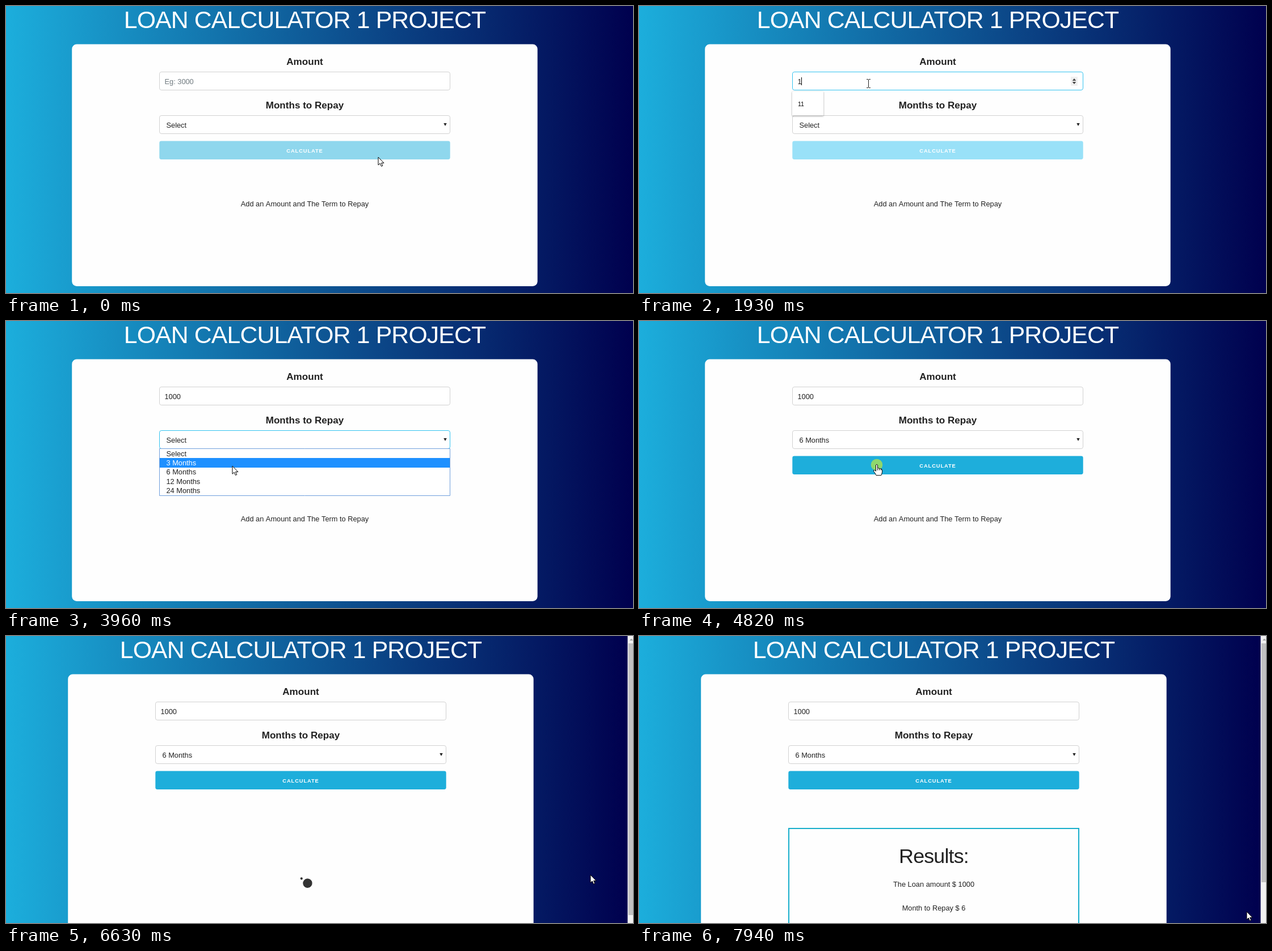
An HTML page with a canvas for the animation above (8000 ms loop, 1105 by 507 pixels).

```html
<!DOCTYPE html>
<html lang="en">
<head>
<meta charset="utf-8">
<title>Loan calculator</title>
<style>
html, body { margin: 0; width: 100%; height: 100%; overflow: hidden; }
canvas { display: block; }
</style>
</head>
<body>
<canvas id="stage" width="1105" height="507"></canvas>
<script>
const W = 1105, H = 507, LOOP = 8000;
const ctx = document.getElementById('stage').getContext('2d');
const SANS = '"Liberation Sans", Arial, sans-serif';
const CYAN = '#33c3f0', INK = '#222', GREY = '#d1d1d1';
const LEFT = 270, MID = 526.5, ROW = 16.2;

// Story beats in ms
const FOCUS = 930, KEYS = [1930, 2010, 2160, 2240], OPEN = 3320, PICK = 4270,
  CLOSE = 4340, PRESS = 4715, LOAD = 4870, DONE = 7940;

// Pointer moves: from ms, to ms, target x, target y
const moves = [
  [69, 70, 640, 187], [170, 530, 437, 137], [740, 760, 404, 137],
  [2900, 3300, 394, 209], [3740, 4040, 400, 266], [4450, 4650, 419, 254],
  [6010, 6170, 624, 243], [6170, 6620, 1030, 422], [6660, 7200, 1071, 487]
];
const clicks = [[835, 1000], [OPEN, 3490], [PICK, CLOSE], [PRESS, 4960]];

const ARROW = new Path2D('M0 0V14L3.2 11L5.5 16.2L7.8 15.2L5.6 10.3H10Z');
const HAND = new Path2D('M-1.5 .4Q0-1.6 1.5 .4V6.2Q3.5 5.2 4.5 6.8Q6.4 6 7.2 7.6' +
  'Q9.5 7 9.6 9.2V12.7Q9 16.2 7.8 18.7H-1Q-3 14.2-5.5 11.4Q-6 8.8-3.5 9.6L-1.5 11.2Z');

const between = (t, a, b) => t >= a && t < b;
const clamp = v => Math.min(1, Math.max(0, v));
const ease = v => v * v * (3 - 2 * v);

function pointerAt(t) {
  return moves.reduce(([x, y], [a, b, tx, ty]) => {
    const k = ease(clamp((t - a) / (b - a)));
    return [x + (tx - x) * k, y + (ty - y) * k];
  }, [656, 267]);
}

function text(str, x, y, size, { color = INK, align = 'left', bold = false, gap = 0 } = {}) {
  ctx.font = `${bold ? 'bold ' : ''}${size}px ${SANS}`;
  ctx.letterSpacing = gap + 'px';
  ctx.textAlign = align;
  ctx.fillStyle = color;
  ctx.fillText(str, x, y);
}

const centered = (str, y, size, opt) => text(str, MID, y, size, { align: 'center', ...opt });

function rect(x, y, w, h, color) {
  ctx.fillStyle = color;
  ctx.fillRect(x, y, w, h);
}

function box(x, y, w, h, r, fill, line) {
  ctx.beginPath();
  ctx.roundRect(x, y, w, h, r);
  ctx.fillStyle = fill;
  ctx.fill();
  if (!line) return;
  ctx.strokeStyle = line;
  ctx.lineWidth = 1;
  ctx.stroke();
}

const field = (y, focus) => box(LEFT + .5, y + .5, 512, 32, 3.4, '#fff', focus ? CYAN : GREY);

function triangle(x, y, w, h, color) {
  ctx.fillStyle = color;
  ctx.beginPath();
  ctx.moveTo(x - w / 2, y);
  ctx.lineTo(x + w / 2, y);
  ctx.lineTo(x, y + h);
  ctx.fill();
}

function disc(x, y, r, color) {
  ctx.fillStyle = color;
  ctx.beginPath();
  ctx.arc(x, y, r, 0, Math.PI * 2);
  ctx.fill();
}

function drawBackground(width) {
  const g = ctx.createLinearGradient(0, 0, width, 0);
  g.addColorStop(0, '#1caedc');
  g.addColorStop(1, '#00004e');
  rect(0, 0, W, H, g);
}

function drawAmount(t, hover) {
  const focus = between(t, FOCUS, OPEN);
  const typed = KEYS.filter(k => k <= t);
  const value = '1000'.slice(0, typed.length);
  centered('Amount', 104, 17.08, { bold: true });
  field(116, focus);
  text(value || 'Eg: 3000', LEFT + 9.5, 137.5, 12.8, { color: value ? INK : '#717b80' });
  const idle = t - (typed.at(-1) ?? FOCUS);
  if (focus && idle % 1060 < 530) rect(279 + Math.round(value.length * 7.12), 126, 1, 14, '#000');
  if (focus || hover) {
    rect(761, 125, 12, 16, '#f0f0f0');
    triangle(767, 132, 6.5, -4, '#444');
    triangle(767, 134, 6.5, 4, '#444');
  }
}

function drawTerm(t) {
  centered('Months to Repay', 181, 17.08, { bold: true });
  field(193, between(t, OPEN, PRESS));
  text(t >= CLOSE ? '6 Months' : 'Select', 282.5, 214.5, 12.8);
  triangle(774, 207, 5.5, 5, INK);
}

function drawButton(t) {
  const fill = t < 70 ? '#8fd7ed' : t < CLOSE ? '#99e1f8' : '#1eaedb';
  box(LEFT + .3, 238.5, 512.4, 32.5, 3.4, fill);
  centered('CALCULATE', 259, 9.4, { color: '#fff', bold: true, gap: 0.854 });
}

function drawSuggestions(t) {
  const items = ['11', '200', '500', '22', '30'].slice(0, t < KEYS[0] ? 5 : 1);
  ctx.save();
  ctx.shadowColor = 'rgba(0,0,0,.4)';
  ctx.shadowBlur = 3;
  ctx.shadowOffsetY = 1;
  box(LEFT, 151, items.length > 1 ? 61.5 : 55, 11 + items.length * 31.5, 1, '#fff');
  ctx.restore();
  items.forEach((s, i) => text(s, 280, 176.5 + i * 31.5, 10.6, { color: '#000' }));
}

function drawOptions(y) {
  const active = Math.max(0, Math.floor((y - 226) / ROW));
  box(LEFT + .5, 225.5, 512, 83, 0, '#fff', '#6f9fdc');
  rect(LEFT + 1, Math.round(226 + active * ROW), 511, 17, '#1e90ff');
  ['Select', ...[3, 6, 12, 24].map(n => n + ' Months')].forEach((s, i) =>
    text(s, 282.5, 239 + i * ROW, 12.8, { color: i === active ? '#fff' : INK }));
}

// Two dots pulse in turn while their frame rotates
function drawLoader(t) {
  const phase = (t + 80) / 2000 % 1;
  ctx.save();
  ctx.translate(526.3, 441.3);
  ctx.rotate(phase * Math.PI * 2);
  for (const i of [0, 1]) {
    const pulse = 1 - Math.abs(2 * ((phase + i / 2) % 1) - 1);
    disc(-11.1, i ? 6.8 : -6.8, 10.25 * ease(pulse), '#333');
  }
  ctx.restore();
}

function drawResults() {
  ctx.strokeStyle = '#18aecb';
  ctx.lineWidth = 2;
  ctx.strokeRect(LEFT + 1, 340, 511, 240);
  centered('Results:', 401, 35.9, { gap: -0.854 });
  centered('The Loan amount $ 1000', 443, 12.8);
  centered('Month to Repay $ 6', 485, 12.8);
}

function drawScrollbar(bottom) {
  rect(1095.5, 0, 10, H, '#f1f1f1');
  rect(1097, 13, 8, bottom - 13, '#c1c1c1');
  triangle(1102, 8, 6, -3.5, '#a3a3a3');
}

function drawPointer(x, y, kind) {
  ctx.save();
  ctx.translate(x, y);
  if (kind === 'beam') {
    rect(0, -7, 1, 14, INK);
    for (const dy of [-8, 7]) {
      rect(-3, dy, 3, 1, INK);
      rect(1, dy, 3, 1, INK);
    }
  } else {
    const shape = kind === 'hand' ? HAND : ARROW;
    ctx.fillStyle = '#fff';
    ctx.strokeStyle = '#000';
    ctx.lineWidth = 1;
    ctx.lineJoin = 'round';
    ctx.fill(shape);
    ctx.stroke(shape);
    if (kind === 'hand') for (const fx of [1, 4, 7]) rect(fx, 6.7, 1, 3, '#000');
  }
  ctx.restore();
}

function draw(t) {
  const loaded = t >= LOAD, done = t >= DONE;
  const [x, y] = pointerAt(t);
  const inside = (top, bottom) => between(x, LEFT, 783) && between(y, top, bottom);
  const overInput = inside(116, 149);
  const overButton = t >= CLOSE && inside(238, 271);

  drawBackground(loaded ? 1096 : W);
  ctx.save();
  if (loaded) ctx.translate(-7, 0);
  centered('LOAN CALCULATOR 1 PROJECT', 39, 42.75, { color: '#fff', gap: -0.854 });
  box(116.2, 67.5, 820.5, loaded ? 500 : 427.5, 8.5, '#fefefe');
  drawAmount(t, overInput);
  drawTerm(t);
  drawButton(t);
  if (done) drawResults();
  else if (loaded) drawLoader(t);
  else centered('Add an Amount and The Term to Repay', 354, 12.8);
  if (between(t, FOCUS, KEYS[1])) drawSuggestions(t);
  if (between(t, OPEN, CLOSE)) drawOptions(y);
  ctx.restore();
  if (loaded) drawScrollbar(done ? 435 : 493);

  if (clicks.some(([a, b]) => between(t, a, b))) disc(x, y, 10.3, 'rgba(255,255,0,.5)');
  drawPointer(x, y, overInput ? 'beam' : overButton ? 'hand' : 'arrow');
}

const start = performance.now();
function frame() {
  draw((performance.now() - start) % LOOP);
  requestAnimationFrame(frame);
}
frame();
</script>
</body>
</html>
```
